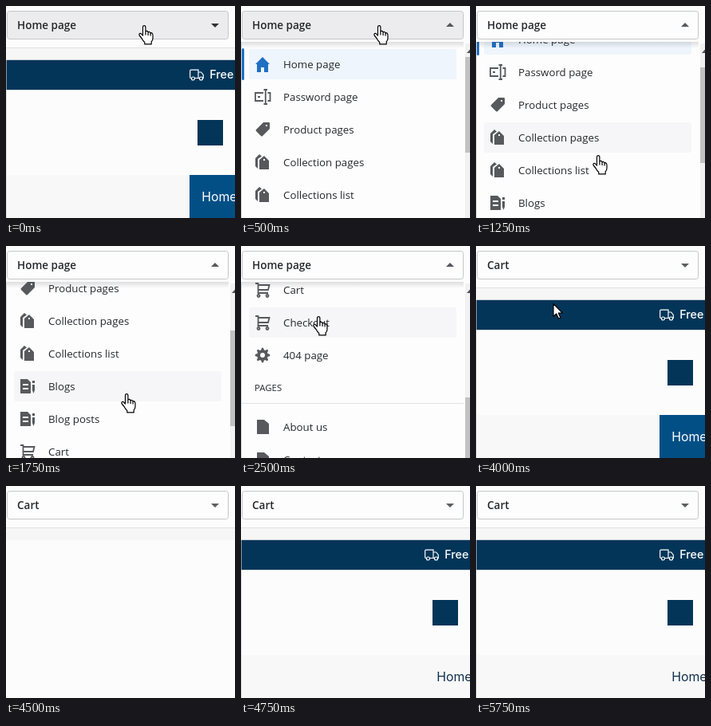
An HTML page with a canvas for the animation above (6750 ms loop, 287 by 266 pixels).

```html
<!DOCTYPE html>
<html lang="en">
<head>
<meta charset="utf-8">
<title>Page selector</title>
<style>
  html, body { margin: 0; width: 100%; height: 100%; overflow: hidden; background: #fcfcfc; }
  canvas { display: block; }
</style>
</head>
<body>
<canvas id="stage" width="287" height="266"></canvas>
<script>
const ctx = document.getElementById('stage').getContext('2d');
const W = 287, H = 266, LOOP = 6750;
const INK = '#26292c', ICON = '#57595d', BLUE = '#1f6fc2', NAVY = '#033558';
const SANS = '"Open Sans", "Noto Sans", sans-serif';
const ROW = 41, FIRST_ROW = 73, LIST_TOP = 45;

// Icons are centred on 0,0.
const icons = {
  home: { fill: 'M-9 0L0 -9 9 0H7V10H2V4H-2V10H-7V0Z' },
  password: { line: 'M1 -5H-9V5H1M6.5 -5H9.5V5H6.5M1.5 -9H6M3.75 -9V9M1.5 9H6M-6 0H-3' },
  tag: { fill: 'M1 -9H8Q9 -9 9 -8V-1L0 8Q-1 9 -2 8L-8 2Q-9 1 -8 0ZM4 -6V-4H6V-6Z' },
  tags: { fill: 'M-4 -3L2 -8 8 -2V9H-4ZM1 -4V-2H3V-4ZM-9 -5L-4 -10 -1 -7.5 -6 -4V8L-9 5Z' },
  blog: { fill: 'M-9 -9H0L4 -5V9H-9ZM-6 -3V-1H1V-3ZM-6 2V4H1V2ZM6 -7H9V-4H6ZM6 -2H9V5L7.5 9 6 5Z' },
  cart: { line: 'M-9 -8H-5.5V4H7M-5.5 -6H8.5L7 0H-5.5M-6.5 7.5a1.5 1.5 0 1 0 3 0a1.5 1.5 0 1 0 -3 0M4.5 7.5a1.5 1.5 0 1 0 3 0a1.5 1.5 0 1 0 -3 0' },
  gear: { fill: gearPath() },
  doc: { fill: 'M-7 -9H2L8 -4V9H-7Z' }
};
const rows = [
  ['home', 'Home page'], ['password', 'Password page'], ['tag', 'Product pages'],
  ['tags', 'Collection pages'], ['tags', 'Collections list'], ['blog', 'Blogs'],
  ['blog', 'Blog posts'], ['cart', 'Cart'], ['cart', 'Checkout'], ['gear', '404 page']
];
const pages = ['About us', 'Contact us'];

const HAND = new Path2D('M5 2.2Q5 .2 6.7 .2T8.4 2.2V7.8Q9 6.6 10.2 6.9T11.6 8.8Q12 7.6 13.2 8T14.6 9.8Q15 8.8 16.2 9.4T17.5 12V16Q17.5 18.5 15.7 20.2V23.4H7.3V21Q5 19 3.6 16L.7 12.5Q-.2 11 1 10.1T3.6 11L5 12.6ZM8.4 8V12M11.6 9V12.5M14.6 10V13');
const ARROW = new Path2D('M.5 .5V16.5L4.2 13 7 19 9.4 18 6.8 12H11.8Z');
const TRUCK = new Path2D('M2.5 11H2Q.7 11 .7 9.7V2Q.7 .7 2 .7H11V11H6.5M11 3.5H14.5L17.3 7V11H16.5M11 11H12.5M2.5 11.5a2 2 0 1 0 4 0a2 2 0 1 0 -4 0M12.5 11.5a2 2 0 1 0 4 0a2 2 0 1 0 -4 0');

// Each step adds to the state left by the one before it.
const steps = [
  { at: 0, label: 'Home page', open: 0, pressed: true, page: 'home', scroll: 0, hover: -1, active: 0, pointer: [HAND, 166.5, 24.5] },
  { at: 500, open: 1 },
  { at: 750, pressed: false, hover: 3, pointer: [HAND, 137, 188] },
  { at: 1000, pointer: [HAND, 143, 188] },
  { at: 1250, scroll: 31, pointer: [HAND, 146.5, 187.5] },
  { at: 1500, scroll: 102, hover: 5, pointer: [HAND, 146, 185.5] },
  { at: 1750, pointer: [HAND, 144.5, 185.5] },
  { at: 2000, scroll: 204, hover: 8 },
  { at: 2250, scroll: 305, pointer: [HAND, 109.5, 123.5] },
  { at: 2500, pointer: [HAND, 90.5, 88.5] },
  { at: 2750, pointer: [HAND, 94, 73] },
  { at: 3000, hover: 7, pointer: [HAND, 91.5, 63.5] },
  { at: 3500, active: 7 },
  { at: 3750, label: 'Cart', open: 0.4 },
  { at: 4000, open: 0, pointer: [ARROW, 96.5, 72] },
  { at: 4250, pointer: [ARROW, 164.5, 250] },
  { at: 4500, page: 'blank', pointer: null },
  { at: 4750, page: 'cart' }
];

function gearPath() {
  const teeth = 8, points = [];
  for (let i = 0; i < teeth * 4; i++) {
    const angle = (i - 0.5) / (teeth * 4) * Math.PI * 2;
    const radius = i % 4 < 2 ? 9.3 : 6.8;
    points.push(`${Math.cos(angle) * radius} ${Math.sin(angle) * radius}`);
  }
  return `M${points.join('L')}ZM-3 0a3 3 0 1 0 6 0a3 3 0 1 0 -6 0`;
}

function rect(x, y, w, h, color) {
  ctx.fillStyle = color;
  ctx.fillRect(x, y, w, h);
}

function roundRect(x, y, w, h, r, fill, stroke) {
  ctx.beginPath();
  ctx.roundRect(x, y, w, h, r);
  ctx.fillStyle = fill;
  ctx.fill();
  if (stroke) {
    ctx.strokeStyle = stroke;
    ctx.lineWidth = 1;
    ctx.stroke();
  }
}

function text(value, x, y, font, color) {
  ctx.font = font;
  ctx.fillStyle = color;
  ctx.fillText(value, x, y);
}

function triangle(x, y, halfWidth, height, color) {
  ctx.beginPath();
  ctx.moveTo(x - halfWidth, y);
  ctx.lineTo(x + halfWidth, y);
  ctx.lineTo(x, y + height);
  ctx.fillStyle = color;
  ctx.fill();
}

function drawIcon(name, y, color) {
  const { fill, line } = icons[name];
  ctx.save();
  ctx.translate(27, y);
  if (fill) {
    ctx.fillStyle = color;
    ctx.fill(new Path2D(fill), 'evenodd');
  } else {
    ctx.strokeStyle = color;
    ctx.lineWidth = 1.8;
    ctx.stroke(new Path2D(line));
  }
  ctx.restore();
}

function drawPage(page) {
  rect(0, 0, W, H, '#fcfcfc');
  rect(0, 52, W, 1, '#dfe0e1');
  rect(0, 53, W, 15, '#f6f6f6');
  if (page === 'blank') return;

  const onHome = page === 'home';
  rect(1, 212, W, 54, '#f8f8f8');
  rect(0, 68, 1, H, '#dcdddf');
  rect(0.6, 67.8, W, 37.4, NAVY);

  ctx.save();
  ctx.translate(230, 79.5);
  ctx.strokeStyle = '#fff';
  ctx.lineWidth = 1.2;
  ctx.stroke(TRUCK);
  ctx.restore();
  text('Free', 255.2, 91, '500 14.3px Inter, sans-serif', '#fff');

  rect(240, 143, 32, 32, NAVY);
  if (onHome) rect(230, 212, 57, 54, '#024f86');
  text('Home', 245.3, 245, '400 15.8px Inter, sans-serif', onHome ? '#fff' : '#12304e');
}

function drawRow(icon, label, y, color) {
  drawIcon(icon, y, color);
  text(label, 53, y + 5, `400 13.3px ${SANS}`, INK);
}

function drawList({ open, scroll, hover, active }) {
  ctx.save();
  ctx.globalAlpha = open;
  ctx.beginPath();
  ctx.rect(0, LIST_TOP, W, H);
  ctx.clip();
  rect(0, LIST_TOP, W, H, '#fdfdfd');

  const rowY = i => FIRST_ROW + i * ROW - scroll;
  if (hover >= 0) roundRect(10, rowY(hover) - 19, 260, 38, 3, '#f6f6f8');
  roundRect(10, rowY(0) - 19, 260, 38, 3, '#eef5fc');
  roundRect(1, rowY(0) - 20, 3, 40, 1.5, BLUE);
  rows.forEach(([icon, label], i) => {
    drawRow(icon, label, rowY(i), i === active || i === 0 ? BLUE : ICON);
  });

  text('PAGES', 17, 486.5 - scroll, `400 11.4px ${SANS}`, INK);
  rect(1, 502 - scroll, 278, 1, '#dfe1e4');
  pages.forEach((label, i) => drawRow('doc', label, 532 + i * ROW - scroll, ICON));

  const shade = ctx.createLinearGradient(0, LIST_TOP, 0, LIST_TOP + 8);
  shade.addColorStop(0, 'rgba(60,65,75,.16)');
  shade.addColorStop(1, 'rgba(60,65,75,0)');
  ctx.fillStyle = shade;
  ctx.fillRect(1, LIST_TOP, 278, 8);

  rect(281, 47, 6, H, '#f1f1f1');
  triangle(287, 59, 4, -4.5, '#505050');
  rect(281, 64 + Math.round(scroll * 0.413), 6, 120, '#c1c1c1');
  rect(0, LIST_TOP, 1, H, '#d3d6d9');
  ctx.restore();
}

function drawSelect({ label, open, pressed }) {
  roundRect(1.5, 6.5, 277, 35, 3, pressed ? '#ececee' : '#fdfdfd', '#c5c7ca');
  text(label, 14, 29, `600 13.5px ${SANS}`, INK);
  if (open === 1) triangle(262, 26, 5, -5, '#55585c');
  else triangle(262, 22, 5, 5, pressed ? '#303236' : '#5c5f62');
}

function drawPointer([shape, x, y]) {
  ctx.save();
  ctx.translate(x, y);
  ctx.fillStyle = '#fff';
  ctx.fill(shape);
  ctx.strokeStyle = '#000';
  ctx.lineWidth = 1.2;
  ctx.lineJoin = 'round';
  ctx.stroke(shape);
  ctx.restore();
}

function draw(now) {
  const time = now % LOOP;
  const state = Object.assign({}, ...steps.filter(step => step.at <= time));
  drawPage(state.page);
  if (state.open) drawList(state);
  drawSelect(state);
  if (state.pointer) drawPointer(state.pointer);
}

const start = performance.now();
function tick() {
  draw(performance.now() - start);
  requestAnimationFrame(tick);
}
tick();
</script>
</body>
</html>
```
